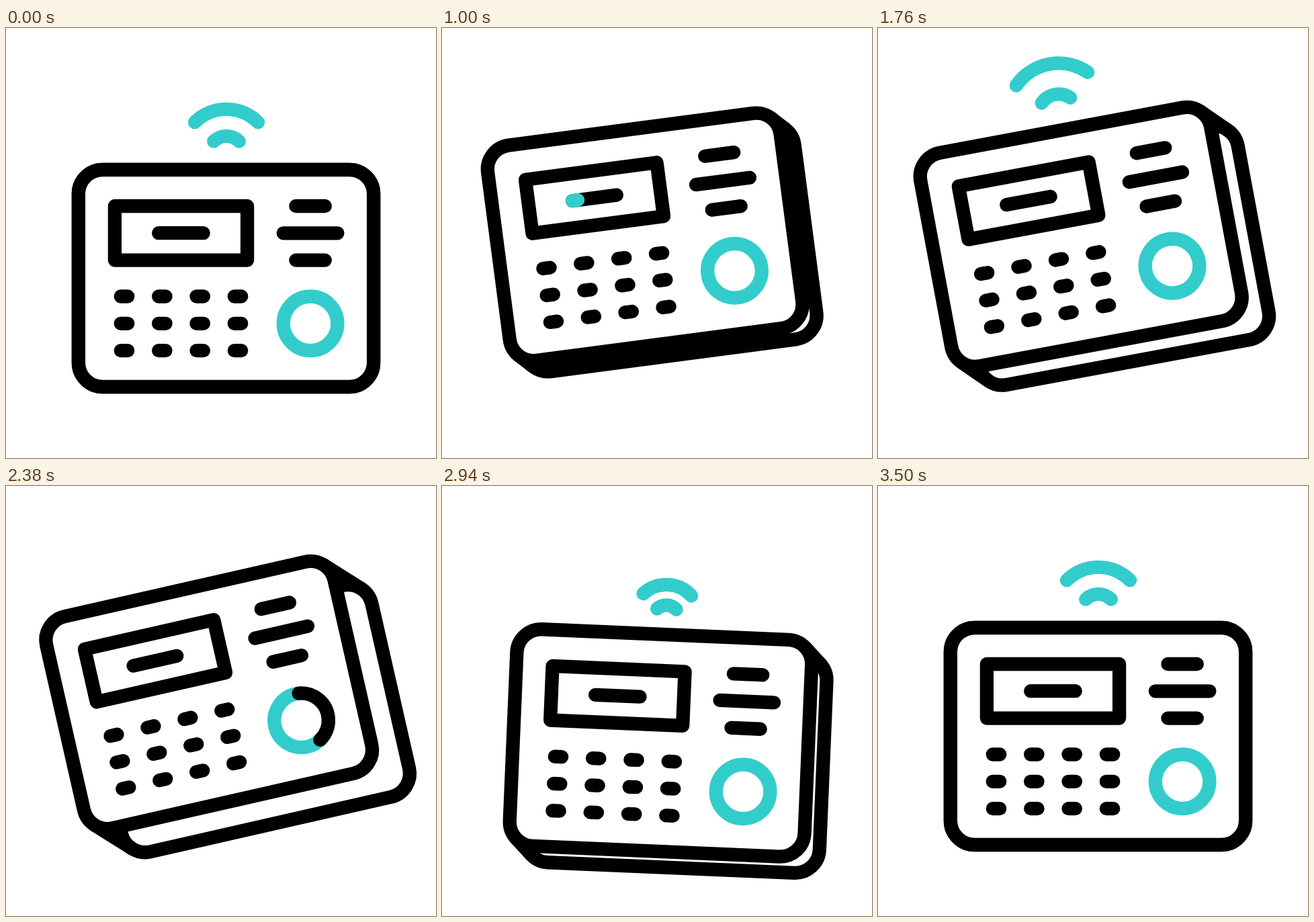
Animation, 640 px wide and 640 px high, one loop 3.6 s. Source, as an HTML page with a canvas:

```html
<!DOCTYPE html>
<html lang="en">
<head>
<meta charset="utf-8">
<title>Access terminal</title>
<style>
  html, body { margin: 0; width: 100%; height: 100%; overflow: hidden; background: #fff; }
  canvas { display: block; width: 640px; height: 640px; }
</style>
</head>
<body>
<canvas id="stage" width="640" height="640"></canvas>
<script>
const ctx = document.getElementById('stage').getContext('2d');
const LOOP = 3600, START = 100, PEAK = 2365, DIP = 3110, END = 3500;
const TEAL = '#33cccc', BLACK = '#000', STROKE = 20.3;
const REST = { x: 327.5, y: 372.5 };
// Keys pressed in turn, as [column, row]
const CODE = [[0, 0], [1, 1], [0, 2], [2, 0]];

const clamp = v => Math.min(1, Math.max(0, v));
const ramp = (t, from, to) => clamp((t - from) / (to - from));
const ease = (t, from, to) => (1 - Math.cos(Math.PI * ramp(t, from, to))) / 2;

// Body position and swing: lift, drop past the resting place, settle
function pose(t) {
  const up = ease(t, START, 655), down = ease(t, PEAK, DIP), settle = ease(t, DIP, END);
  const track = (lifted, dipped) => lifted * (up - down) + dipped * (down - settle);
  const turn = t < PEAK ? ramp(t, START, PEAK) : 1 - ramp(t, PEAK, END);
  return {
    x: REST.x + track(-25.3, 1.2),
    y: REST.y + track(-61.6, 19.8),
    angle: (track(-3.85, 8.4) - 9.1 * turn) * Math.PI / 180,
    depth: 47.3 * turn
  };
}

function waveScale(t) {
  if (t < 720) return 1 + 0.73 * ease(t, START, 700);
  if (t < 2210) return 1.73 * ease(t, 1100, 2190);
  return ease(t, 2563, 3123);
}

function stroke(color) {
  ctx.strokeStyle = color;
  ctx.stroke();
}

function line(x1, y1, x2, y2, color = BLACK) {
  ctx.beginPath();
  ctx.moveTo(x1, y1);
  ctx.lineTo(x2, y2);
  stroke(color);
}

function arc(x, y, r, from, to, color) {
  ctx.beginPath();
  ctx.arc(x, y, r, from, to);
  stroke(color);
}

function panel(x, y) {
  ctx.beginPath();
  ctx.roundRect(x - 219.6, y - 161.5, 439.2, 323, 36);
  ctx.fillStyle = '#fff';
  ctx.fill();
  stroke(BLACK);
}

function waves(t) {
  const s = waveScale(t), half = Math.PI / 4;
  ctx.globalAlpha = clamp(s * 3 - 0.5);
  for (const r of [26.6, 66.6])
    arc(0.5, -185, r * s, -Math.PI / 2 - half, -Math.PI / 2 + half, TEAL);
  ctx.globalAlpha = 1;
}

function keypad(t) {
  for (let row = 0; row < 3; row++) {
    for (let col = 0; col < 4; col++) {
      const x = -151.5 + col * 56.35, y = 27 + row * 40.3;
      const order = CODE.findIndex(([c, r]) => c === col && r === row);
      const on = START + order * 100;
      const glow = order < 0 ? 0 : ramp(t, on, on + 90) - ramp(t, on + 250, on + 340);
      line(x - 5.2, y, x + 5.2, y, `rgb(${51 * glow},${204 * glow},${204 * glow})`);
    }
  }
}

function display(t) {
  ctx.beginPath();
  ctx.rect(-165.6, -107.5, 197.2, 80.6);
  stroke(BLACK);
  const x = -100.3, length = 66.5, y = -67.3;
  line(x, y, x + length, y);
  const tail = ease(t, 1160, 1560), head = ease(t, 910, 1310);
  if (head > tail) line(x + length * tail, y, x + length * head, y, TEAL);
}

function ring(t) {
  const x = 125.6, y = 67.3, r = 40.3, turn = 2 * Math.PI, top = -Math.PI / 2;
  arc(x, y, r, 0, turn, TEAL);
  const tail = ease(t, 2327, 2927), head = ease(t, 2114, 2714);
  if (head > tail) arc(x, y, r, top + turn * tail, top + turn * head, BLACK);
}

function draw(t) {
  const { x, y, angle, depth } = pose(t);
  ctx.fillStyle = '#fff';
  ctx.fillRect(0, 0, 640, 640);
  ctx.save();
  ctx.translate(x, y);
  ctx.rotate(angle);
  ctx.lineWidth = STROKE;
  ctx.lineCap = ctx.lineJoin = 'round';

  waves(t);
  panel(depth, depth);
  for (const side of [1, -1])
    line(209 * side, -151 * side, 209 * side + depth, -151 * side + depth);
  panel(0, 0);
  display(t);
  [21.7, 40.3, 21.7].forEach((half, i) => {
    const barY = -107.5 + i * 40.3;
    line(125.6 - half, barY, 125.6 + half, barY);
  });
  keypad(t);
  ring(t);
  ctx.restore();
}

const begin = performance.now();
function tick() {
  draw((performance.now() - begin) % LOOP);
  requestAnimationFrame(tick);
}
tick();
</script>
</body>
</html>
```
